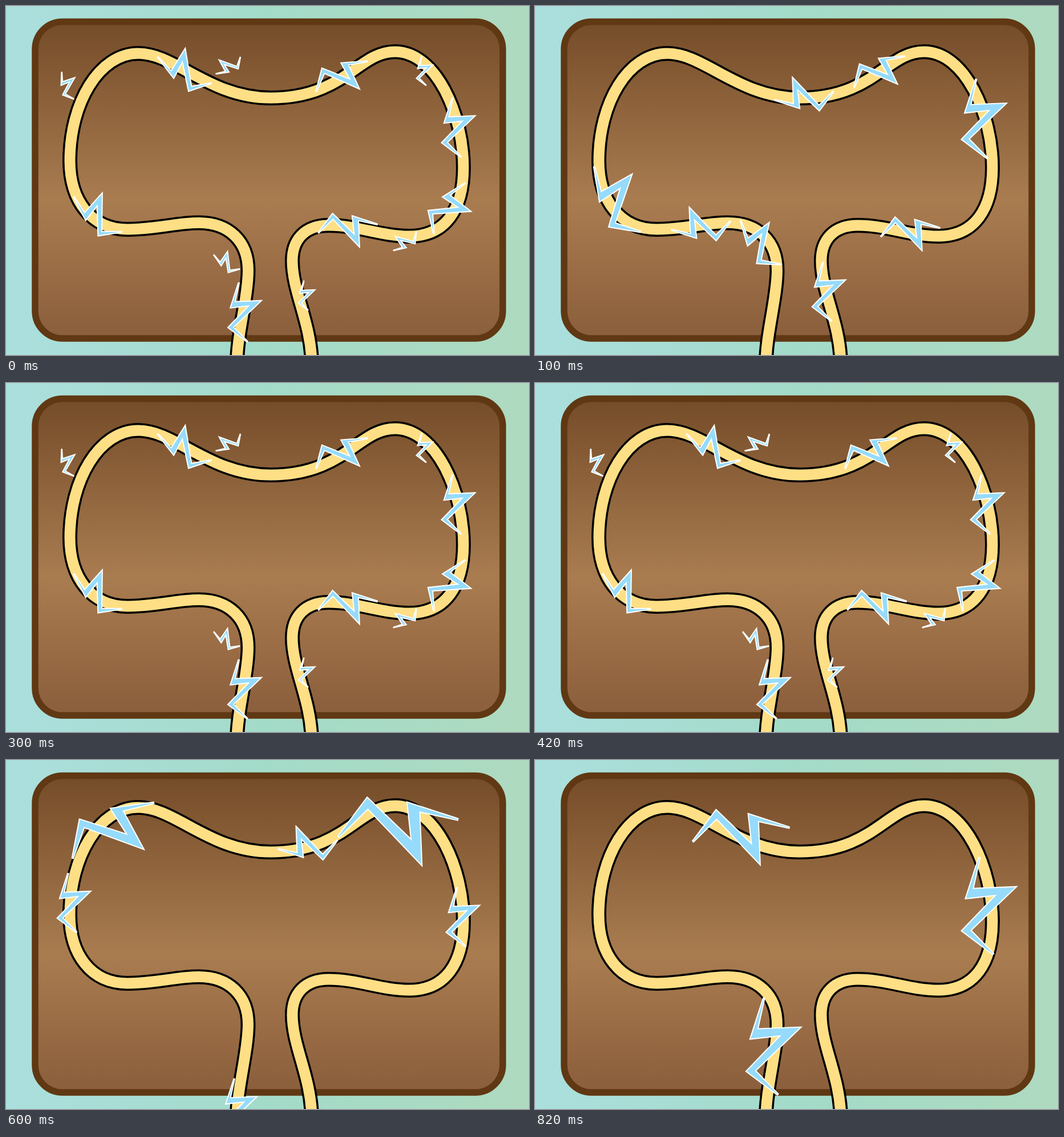
An HTML page that plays this animation: 917 px wide and 611 px high, repeating every 900 ms.

```html
<!DOCTYPE html>
<html lang="en">
<head>
<meta charset="utf-8">
<title>Sparking rope</title>
<style>
  html, body { margin: 0; width: 100%; height: 100%; overflow: hidden; }
  svg { display: block; width: 100%; height: 100%; }
  .rope { fill: none; }
  .bolts use { fill: #96dbfb; stroke: #fff; stroke-width: 2; }
  #bolt { vector-effect: non-scaling-stroke; stroke-miterlimit: 4; }
</style>
</head>
<body>
<svg id="stage" viewBox="0 0 917 611" preserveAspectRatio="none">
  <defs>
    <linearGradient id="sky">
      <stop offset="0" stop-color="#abdfde"/>
      <stop offset=".5" stop-color="#a3dbc9"/>
      <stop offset="1" stop-color="#aedabf"/>
    </linearGradient>
    <linearGradient id="wood" x2="0" y2="1">
      <stop offset="0" stop-color="#754c29"/>
      <stop offset=".56" stop-color="#a97c50"/>
      <stop offset="1" stop-color="#8b5e3c"/>
    </linearGradient>
    <path id="rope" d="M405 720C405 690 405 655 405 625
      C405 575 424.5 510 424.5 463C424.5 412 391 379.5 338 379.5
      C298 379.5 262 391 213 391C149 391 112 340 112 271C112 170 163 83 232 83
      C297 83 357 161 464 161C594 161 617 80 682 80C754 80 802 190 802 283
      C802 355 771 403 707 403C658 403 617 384 566 384C524 384 502 409 502 446
      C502 500 535 555 536 625"/>
    <path id="bolt" d="M-13.5-84.5L-36.9-12.2L15.7-18L-43.8 44L11.2 85.3L13 83.6
      L-26.8 43L53.1-33.5L-22.8-30.5L-11-84Z"/>
  </defs>
  <rect width="917" height="611" fill="url(#sky)"/>
  <rect x="51" y="27.5" width="820" height="554.5" rx="48" fill="url(#wood)" stroke="#603813" stroke-width="11.5"/>
  <use href="#rope" class="rope" stroke="#000" stroke-width="26"/>
  <use href="#rope" class="rope" stroke="#ffdf85" stroke-width="19"/>
</svg>
<script>
const SVG_NS = 'http://www.w3.org/2000/svg';
const stage = document.getElementById('stage');
const STEP = 100;
const SEQUENCE = [0, 1, 2, 0, 0, 1, 2, 3, 3];

const HALF_BOLT = 86;   // half the tip-to-tip length at size 1
const BOLT_ANGLE = 82;  // tip-to-tip direction of the unturned bolt
const SAMPLES = 200;    // per curve of the rope
const points = sampleRope();

function sampleRope() {
  const values = document.getElementById('rope').getAttribute('d').match(/[\d.]+/g).map(Number);
  const result = [];
  for (let k = 0; k + 7 < values.length; k += 6) {
    for (let i = 0; i < SAMPLES; i++) {
      const t = i / SAMPLES, s = 1 - t;
      const cubic = j => s ** 3 * values[j] + 3 * s * s * t * values[j + 2] +
                         3 * s * t * t * values[j + 4] + t ** 3 * values[j + 6];
      result.push({ x: cubic(k), y: cubic(k + 1) });
    }
  }
  return result;
}

// First rope point at the given distance from point number `from`.
function reach(from, direction, distance) {
  const { x, y } = points[from];
  let i = from;
  while (points[i + direction] && Math.hypot(points[i].x - x, points[i].y - y) < distance) i += direction;
  return points[i];
}

function place(x, y, turn, size) {
  return `translate(${x} ${y}) rotate(${turn}) scale(${size})`;
}

// Steep stretches keep a bolt upright, flat ones lay it on its side,
// slanted ones turn it along the rope.
function turnAlong(angle) {
  if (angle < 24) return 90;
  if (angle > 153) return -90;
  return angle > 65 && angle < 105 ? 0 : angle - BOLT_ANGLE;
}

// A bolt spanning a bend of the rope; `at` is curve number plus progress.
function onRope(size, at) {
  const middle = Math.round(at * SAMPLES);
  const a = reach(middle, -1, size * HALF_BOLT);
  const b = reach(middle, 1, size * HALF_BOLT);
  const angle = (Math.atan2(b.y - a.y, b.x - a.x) * 180 / Math.PI + 180) % 180;
  const inward = (a1, b1, m) => m + (a1 + b1 - 2 * m) / 3;
  return place(inward(a.x, b.x, points[middle].x), inward(a.y, b.y, points[middle].y),
               turnAlong(angle), size);
}

// A small bolt thrown off to the outer side of the rope.
function loose(at, drift, turn) {
  const i = Math.round(at * SAMPLES);
  const { x, y } = points[i];
  const dx = points[i + 1].x - x, dy = points[i + 1].y - y;
  const k = drift / Math.hypot(dx, dy);
  return place(x + dy * k, y - dx * k, turn, 0.3);
}

const row = (size, ...spots) => spots.map(at => onRope(size, at));

const poses = [
  [...row(0.61, 1.54, 4.36, 6.41, 7.46, 8.75, 9.42, 10.77),
   loose(2.16, 36, -53), loose(5.43, 33, -16), loose(6.68, 41, -116),
   loose(8.3, -10, 0), loose(10.05, 9, -121), loose(12.39, 13, 0)],
  [...row(0.61, 2.46, 3.4, 7.02, 7.54, 10.35, 12.33), ...row(0.82, 4.57, 8.69)],
  [...row(0.61, 1.1, 5.07, 7.2, 8.97), ...row(1.01, 5.7), ...row(1.24, 8.06)],
  row(1, 1.75, 6.62, 8.9)
];

function add(parent, tag, attributes) {
  const node = document.createElementNS(SVG_NS, tag);
  for (const [key, value] of Object.entries(attributes)) node.setAttribute(key, value);
  return parent.appendChild(node);
}

const groups = poses.map(bolts => {
  const group = add(stage, 'g', { class: 'bolts' });
  bolts.forEach(transform => add(group, 'use', { href: '#bolt', transform }));
  return group;
});

function draw(time) {
  const active = SEQUENCE[Math.floor(time / STEP) % SEQUENCE.length];
  groups.forEach((group, i) => group.setAttribute('display', i === active ? 'inline' : 'none'));
}

const start = performance.now();
function tick() {
  draw(performance.now() - start);
  requestAnimationFrame(tick);
}
tick();
</script>
</body>
</html>
```
